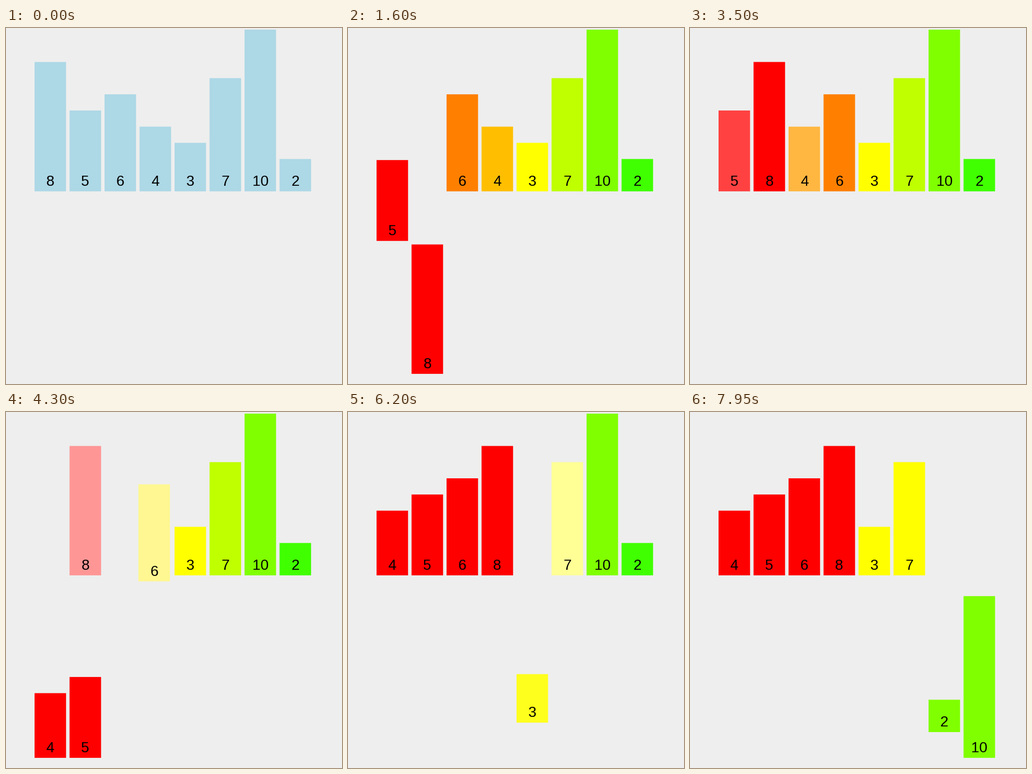
Recreate the animation shown at these times as a matplotlib script. Size 600 by 634 pixels, loop 8000 ms.

```python
import colorsys

import matplotlib.pyplot as plt
import numpy as np
from matplotlib.animation import FuncAnimation
from matplotlib.patches import Rectangle

W, H, DPI = 600, 634, 100
STEP, LOOP = 50, 8000
VALUES = [8, 5, 6, 4, 3, 7, 10, 2]
LEFT, PITCH, BAR_W, UNIT = 51, 62.5, 56.25, 28.8
BASE, DROP = 290.9, 325
TWEEN = 250
LIGHT_BLUE = np.array([173, 216, 230.0])


def hue(slot):
    return np.array(colorsys.hsv_to_rgb(slot / 24, 1, 1)) * 255


def pale(color):
    return np.minimum(color + 150, 255)


# Each step is a list of (bar, property, goal) tweens that run together.
steps = [[(i, "color", hue(i)) for i in range(len(VALUES))]]
tint = {i: hue(i) for i in range(len(VALUES))}


def glow(bar):
    return (bar, "color", pale(tint[bar]))


def merge(a, b, first):
    """Merge two sorted runs of bars that start at slot `first`."""
    a, b, out = list(a), list(b), []
    steps.append([glow(a[0]), glow(b[0])])
    color = hue(first)
    while a or b:
        run = a if not b or (a and VALUES[a[0]] <= VALUES[b[0]]) else b
        bar = run.pop(0)
        moves = [(bar, "slot", first + len(out)), (bar, "drop", 1),
                 (bar, "color", color)]
        if run:
            moves.append(glow(run[0]))
        steps.append(moves)
        out.append(bar)
    for bar in out:
        steps.append([(bar, "drop", 0)])
        tint[bar] = color
    return out


def merge_sort(lo, hi):
    if hi - lo == 1:
        return [lo]
    mid = (lo + hi) // 2
    return merge(merge_sort(lo, mid), merge_sort(mid, hi), lo)


merge_sort(0, 8)

# Start time of each step, paced between a few known beats.
beat_step = [0, 4, 11, 14, 18, 21, 28, 35]
beat_ms = [310, 1452, 3381, 4252, 5203, 6041, 7868, 9695]
starts = np.interp(np.arange(36), beat_step, beat_ms)


def ease(t):
    t = min(max(t, 0), 1)
    return 4 * t ** 3 if t < 0.5 else 1 - 4 * (1 - t) ** 3


def bars_at(ms):
    bars = [{"slot": i, "drop": 0, "color": LIGHT_BLUE}
            for i in range(len(VALUES))]
    for start, end, tweens in zip(starts, starts[1:], steps):
        if start >= ms:
            break
        f = ease((ms - start) / min(TWEEN, end - start))
        for i, prop, goal in tweens:
            now = bars[i][prop]
            bars[i][prop] = now + (goal - now) * f
    return bars


fig = plt.figure(figsize=(W / DPI, H / DPI), dpi=DPI, facecolor="#eeeeee")
ax = fig.add_axes([0, 0, 1, 1])
ax.set_xlim(0, W)
ax.set_ylim(H, 0)
ax.axis("off")

rects, labels = [], []
for i, value in enumerate(VALUES):
    rect = Rectangle((0, 0), BAR_W, value * UNIT, lw=0, snap=False,
                     zorder=2 * i + 2)
    rects.append(ax.add_patch(rect))
    labels.append(ax.text(0, 0, str(value), ha="center", va="baseline",
                          family="Liberation Sans", fontsize=26 * 72 / DPI,
                          color="black", zorder=2 * i + 3))


def draw(k):
    for bar, rect, label in zip(bars_at(k * STEP), rects, labels):
        x = LEFT + PITCH * bar["slot"]
        bottom = BASE + DROP * bar["drop"]
        rect.set_xy((x, bottom - rect.get_height()))
        rect.set_facecolor(np.clip(bar["color"] / 255, 0, 1))
        label.set_position((x + BAR_W / 2, bottom - 10))
    return rects + labels


anim = FuncAnimation(fig, draw, frames=LOOP // STEP, interval=STEP,
                     init_func=lambda: draw(0), repeat=True, repeat_delay=0)
plt.show()
```
